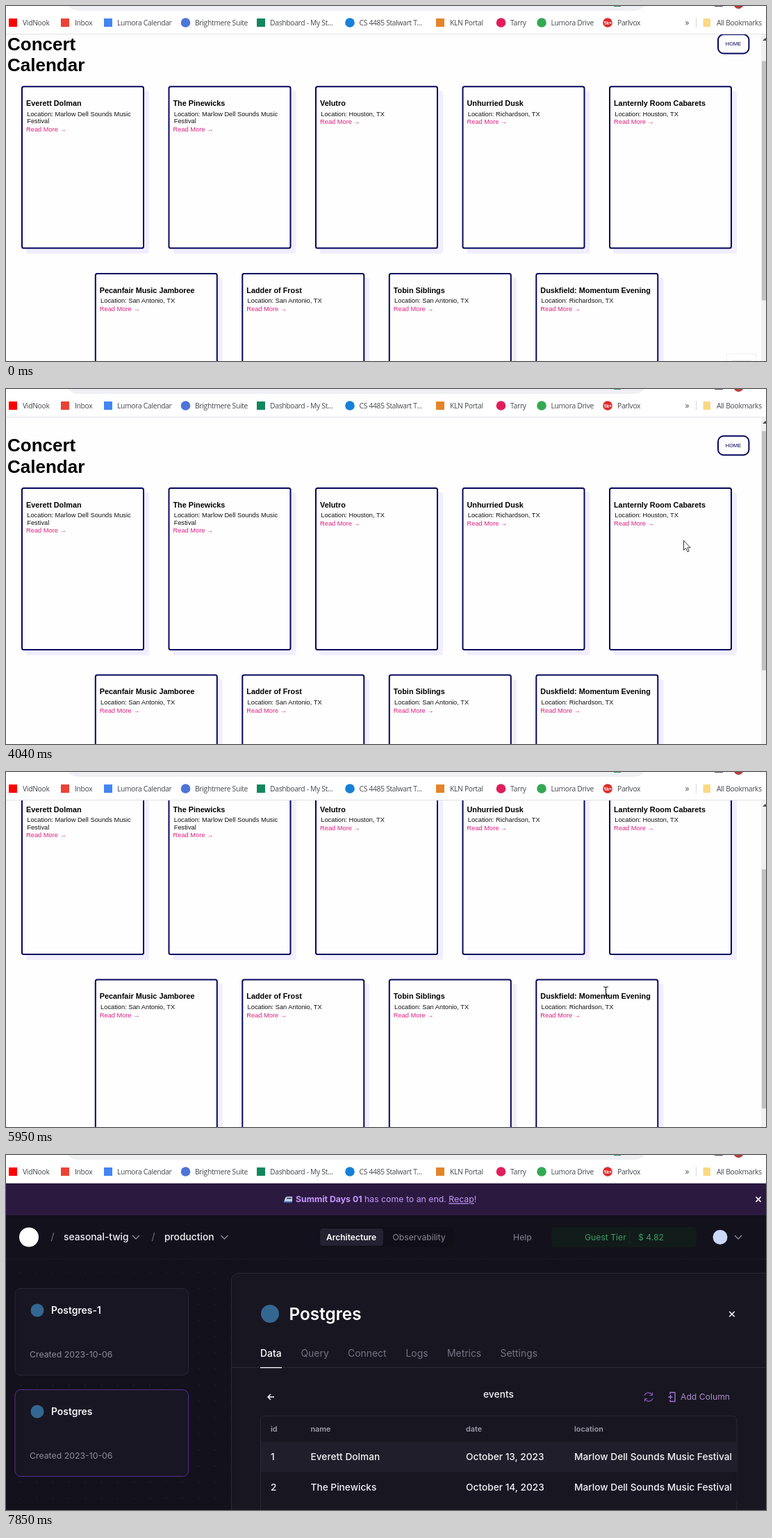
An HTML page for the animation above (8 s loop, 1094x512 px).

```html
<!DOCTYPE html>
<html lang="en">
<head>
<meta charset="utf-8">
<title>Concert Calendar</title>
<style>
  html, body { margin: 0; width: 100%; height: 100%; overflow: hidden; background: #fefefe; }
  svg { display: block; width: 1094px; height: 512px; }
  text { white-space: pre; }
  .page { font-family: "Liberation Sans", Arial, sans-serif; }
  .bar { font: 10.3px "Open Sans", "Noto Sans", sans-serif; letter-spacing: -.3px; fill: #45484c; }
  .dark { font-family: Inter, sans-serif; }
</style>
</head>
<body>
<svg id="stage" viewBox="0 0 1094 512"></svg>
<script>
const LOOP = 8000;
const NAVY = '#06065c';
const stage = document.getElementById('stage');

const text = (x, y, str, size, fill, extra = '') =>
  `<text x="${x}" y="${y}"${size ? ` font-size="${size}"` : ''}${fill ? ` fill="${fill}"` : ''} ${extra}>${str}</text>`;
const rect = (x, y, w, h, fill, extra = '') =>
  `<rect x="${x}" y="${y}" width="${w}" height="${h}" fill="${fill}" ${extra}/>`;
const dot = (x, y, r, fill) => `<circle cx="${x}" cy="${y}" r="${r}" fill="${fill}"/>`;
const path = (d, stroke, width = 1.2, extra = '') =>
  `<path d="${d}" fill="none" stroke="${stroke}" stroke-width="${width}" ${extra}/>`;
const bold = 'font-weight="700"', semi = 'font-weight="600"', medium = 'font-weight="500"';

// ---- concert page ----
const FEST = ['Marlow Dell Sounds Music', 'Festival'];
const rows = [
  { x: 22, y: 150, cards: [
    ['Everett Dolman', ...FEST],
    ['The Pinewicks', ...FEST],
    ['Velutro', 'Houston, TX'],
    ['Unhurried Dusk', 'Richardson, TX'],
    ['Lanternly Room Cabarets', 'Houston, TX']] },
  { x: 127.8, y: 419.6, cards: [
    ['Pecanfair Music Jamboree', 'San Antonio, TX'],
    ['Ladder of Frost', 'San Antonio, TX'],
    ['Tobin Siblings', 'San Antonio, TX'],
    ['Duskfield: Momentum Evening', 'Richardson, TX']] }
];

function card(x, y, [name, place, more]) {
  const linkY = y + (more ? 65.3 : 55);
  return rect(x + 7, y + 7, 177, 235, '#f0eeff', 'rx="3"') +
    rect(x + 1, y + 1, 175, 233, '#fefefe', `rx="2.5" stroke="${NAVY}" stroke-width="2"`) +
    text(x + 7, y + 28.8, name, 10.85, '#000', bold) +
    text(x + 8.3, y + 43.3, 'Location: ' + place, 9.28, '#111') +
    (more ? text(x + 8.3, y + 53.8, more, 9.28, '#111') : '') +
    text(x + 7, linkY, 'Read More →', 9.3, '#e0217f');
}

function concertPage() {
  const cards = rows.map(r => r.cards.map((c, i) => card(r.x + i * 211.5, r.y, c)).join('')).join('');
  return `<g id="light" class="page">${rect(0, 40, 1094, 472, '#fefefe')}
    <g id="scroll">
      ${text(2, 98.3, 'Concert', 26, '#000', bold)}${text(2, 128.5, 'Calendar', 26, '#000', bold)}
      ${rect(1025, 75.8, 44.4, 27.4, '#fefefe', `rx="8" stroke="${NAVY}" stroke-width="2"`)}
      ${text(1047, 92.2, 'HOME', 7.5, NAVY, 'text-anchor="middle"')}
      ${cards}
    </g>
    ${rect(1087, 41, 7, 471, '#f1f1f1')}
    <path id="up" d="M1089 50L1093 46L1097 50Z"/>
    <rect id="thumb" x="1088" y="55" width="6" height="345" fill="#c1c1c1"/>
    <g id="ghost">${rect(1037.5, 501.5, 42, 20, 'none', 'stroke="#f1f1f1"')}
      <g id="ghostText">${rect(1045, 510.5, 28, 2, '#ececec')}</g></g>
  </g>`;
}

// ---- dark dashboard ----
const chevron = (x, y) => path(`M${x - 5} ${y - 2.5}l5 5l5 -5`, '#8d8998', 1.4);
const cross = (x, y, s) => path(`M${x - s} ${y - s}l${2 * s} ${2 * s}M${x + s} ${y - s}l${-2 * s} ${2 * s}`, '#fff', 1.5);

function service(y, name, stroke) {
  return rect(13, y, 249.5, 125, '#181622', `rx="8" stroke="${stroke}"`) +
    dot(45, y + 31.5, 9.5, '#336791') +
    text(65, y + 36.7, name, 13.9, '#f4f3f7', semi) +
    text(34, y + 99, 'Created 2023-10-06', 12.3, '#8f8b9b');
}

function record(y, fill, cells) {
  return rect(367, y, 685, 43.5, fill) +
    [381, 438.5, 662, 818].map((x, i) => text(x, y + 26.6, cells[i], 13.7, '#f4f3f7', medium)).join('');
}

function dashboard() {
  const tabs = [[366, 'Data'], [424.5, 'Query'], [492, 'Connect'], [575.5, 'Logs'], [635, 'Metrics'], [711.5, 'Settings']];
  const heads = [[381, 'id'], [438.5, 'name'], [662, 'date'], [818, 'location']];
  return `<g id="dark" class="dark">
    <defs><pattern id="dots" x="10" y="158" width="23.3" height="23.3" patternUnits="userSpaceOnUse">${dot(11, 11, .7, '#2f2c3a')}</pattern></defs>
    ${rect(0, 41, 1094, 471, '#13111c')}${rect(0, 150, 324, 362, 'url(#dots)')}
    ${rect(0, 41, 1094, 46, '#2b1940')}
    <path d="M400 68l2-6q1-2 3-2h7v8z" fill="#cfd8e6"/>${rect(400, 66.5, 12, 2, '#4f86c6')}${rect(404, 61.5, 7, 2, '#35506f')}
    <text x="417" y="68.4" font-size="12.3" fill="#c597fb"><tspan ${bold}>Summit Days 01</tspan> has come to an end. <tspan text-decoration="underline">Recap</tspan>!</text>
    ${cross(1083, 64, 3.6)}
    ${dot(33, 118.5, 14, '#fff')}
    ${text(64.5, 123.3, '/', 14, '#777382')}${text(83, 123.3, 'seasonal-twig', 13.8, '#f4f3f7', medium)}${chevron(187, 118.5)}
    ${text(209.5, 123.3, '/', 14, '#777382')}${text(228, 123.3, 'production', 13.8, '#f4f3f7', medium)}${chevron(314.5, 118.5)}
    ${rect(451, 104, 193, 29, '#100e17', 'rx="5"')}${rect(452, 106, 91, 25, '#242130', 'rx="4"')}
    ${text(461, 122.8, 'Architecture', 12, '#fff', semi)}${text(556.5, 122.8, 'Observability', 12.2, '#8b8795')}
    ${text(730, 122.8, 'Help', 12.3, '#868291')}
    ${rect(785, 104, 209, 29, '#111b19', 'rx="5"')}
    ${text(833, 122.8, 'Guest Tier', 12.2, '#3f9a68')}${rect(897, 109, 1, 19, '#1b2823')}${text(910, 122.8, '$ 4.82', 12.2, '#3f9a68')}
    ${dot(1028, 118.5, 10.5, '#cbd8f6')}${chevron(1054, 118.5)}
    ${path('M0 150H1094', '#24212e', 1, 'stroke-dasharray="2 2"')}
    ${service(192.5, 'Postgres-1', '#2b2836')}${service(338.5, 'Postgres', '#55318c')}
    ${rect(324.5, 170.5, 800, 400, '#181621', 'rx="10" stroke="#2b2836"')}
    ${dot(380, 229, 13, '#336791')}${text(407.5, 238.2, 'Postgres', 24.3, '#fff', semi)}${cross(1045, 229.5, 3.8)}
    ${tabs.map(([x, s], i) => text(x, 290.5, s, 13.9, i ? '#777382' : '#fff', i ? '' : medium)).join('')}
    ${rect(325, 306, 769, 1, '#2b2836')}${rect(366, 306, 31, 1.3, '#fff')}
    ${path('M386 349H377M381 345l-4 4l4 4', '#fff', 1.4)}
    ${text(709, 349.5, 'events', 13.8, '#f4f3f7', medium + ' text-anchor="middle"')}
    ${path('M919 347a6 6 0 0 1 11 -1M931 351a6 6 0 0 1 -11 1M930.500 342.500v4h-4M919.500 355.500v-4h4', '#8459b8')}
    ${path('M956 345v-2.500h7v13h-7v-2.500M953.500 349h6M956.500 346v6', '#a077d0', 1.4)}
    ${text(971, 353.3, 'Add Column', 12.2, '#a88bc9')}
    ${rect(366.5, 376.5, 685.5, 160, '#181621', 'rx="6" stroke="#2b2836"')}
    ${heads.map(([x, s]) => text(x, 398.6, s, 10.8, '#a09cab', semi)).join('')}
    ${record(413.5, '#201e2a', ['1', 'Everett Dolman', 'October 13, 2023', FEST.join(' ')])}
    ${record(457, '#181621', ['2', 'The Pinewicks', 'October 14, 2023', FEST.join(' ')])}
  </g>`;
}

// ---- browser bar ----
function bookmarks() {
  const items = [
    [10, '#f00', 0, 24, 'VidNook'], [85, '#ea4335', 0, 99, 'Inbox'],
    [147, '#4285f4', 0, 160, 'Lumora Calendar'], [258.5, '#4f74d9', 1, 272, 'Brightmere Suite'],
    [367, '#12875d', 0, 380, 'Dashboard - My St...'], [495, '#1680d8', 1, 508.5, 'CS 4485 Stalwart T...'],
    [625, '#e5842b', 0, 639, 'KLN Portal'], [712.5, '#e01e5a', 1, 726, 'Tarry'],
    [771, '#34a853', 1, 784.5, 'Lumora Drive'], [866, '#df2c2c', 1, 880, 'Parlvox']];
  return `<g class="bar">${rect(0, 0, 1094, 41, '#fff')}${rect(85, -31, 838, 38, '#eef0f3', 'rx="19"')}
    ${rect(875, -1, 10, 2, '#3f9168')}${rect(1020, -1, 12, 2, '#555b66')}${dot(1054.500, -3, 7, '#b5403c')}
    ${rect(0, 40, 1094, 1, '#dfe1e5')}
    ${items.map(([cx, c, round, x, s]) =>
      (round ? dot(cx, 24, 6.8, c) : rect(cx - 6, 18, 12, 12, c)) + text(x, 28, s)).join('')}
    ${text(866, 27, '1k+', 7, '#fff', bold + ' text-anchor="middle"')}
    ${text(977.5, 27.5, '»', 12)}${rect(993, 17, 1, 14, '#d5d8dc')}
    <path d="M1004 18h9q1 0 1 1v11h-9q-1.500 0-1.500-1.500v-9.500q0-1 .5-1z" fill="#fbd883"/>
    ${text(1023, 28, 'All Bookmarks')}</g>`;
}

function hoverCard() {
  return `<g id="tip">
    ${rect(806, -20, 223, 174.5, '#000', 'rx="5" opacity=".07"')}
    ${rect(807, -20, 221, 173, '#fbfbfc', 'rx="4" stroke="#d9dbdf" stroke-width="1"')}
    ${rect(808, 29, 219, 123, '#f8f9fa')}
    ${text(823, 15, 'railway.app', 11, '#5c5c60', 'font-family="Open Sans, sans-serif"')}
    ${dot(916.500, 89.500, 23, '#e6e8eb')}
    <path d="M898 87l12 11v4l5 4v5q-16-3-17-24zM920 71v3q0 4-5 4v5h-5v5h13q3 0 3 4v6h4q3 0 4 4 9-12 1-24-5-6-15-7z" fill="#f8f9fa"/>
  </g>`;
}

const pointer = `<g id="pointer">
  <path id="arrow" d="M0 0V14L3.200 11L5.500 16.300L7.700 15.400L5.500 10.300H9.700Z" fill="#fff" stroke="#222" stroke-width=".9"/>
  ${path('M-3.500 -6.500H-1Q0 -6.500 0 -5.500Q0 -6.500 1 -6.500H3.500M0 -5.500V5.500M-3.500 6.500H-1Q0 6.500 0 5.500Q0 6.500 1 6.500H3.500', '#111', 1.1, 'id="beam"')}</g>`;

stage.innerHTML = concertPage() + dashboard() + bookmarks() + hoverCard() + pointer;
const el = Object.fromEntries([...stage.querySelectorAll('[id]')].map(n => [n.id, n]));

// ---- motion ----
const scrollSteps = [[0, 34.7], [1010, 17], [1080, 0], [4040, 8], [4110, 48], [4180, 92],
  [4240, 116.3], [4310, 130], [5950, 121], [6015, 52], [6080, 0]];
const tipSteps = [[0, 0], [7570, .3], [7640, .62], [7710, .86], [7790, 1], [7850, 0]];

// start, end, steps, then way points [step, x, y, over text]
const moves = [
  [400, 740, 6, [[1, 1032, 497], [3, 880, 335], [5, 777, 232], [6, 784.5, 225.5]]],
  [1480, 2230, 12, [[0, 784.5, 225.5], [3, 620, 190], [7, 310, 125], [10, 130, 76], [11, 80, 79, 1], [12, 40, 95, 1]]],
  [2300, 3070, 12, [[0, 40, 95, 1], [2, 9, 112, 1], [4, 40, 148], [7, 165, 184], [10, 360, 195.5], [12, 483.5, 184.5]]],
  [3140, 3210, 2, [[0, 483.5, 184.5], [2, 566, 202]]],
  [3410, 3770, 6, [[0, 566, 202], [3, 800, 207], [6, 975.5, 218.5]]],
  [4310, 4780, 8, [[0, 975.5, 218.5], [4, 640, 262], [8, 260, 296]]],
  [4850, 5550, 11, [[0, 260, 296], [2, 195, 290], [5, 400, 300], [8, 650, 306], [11, 863.5, 316.5, 1]]],
  [6080, 6081, 2, [[0, 863, 308], [2, 863, 308]]],
  [6480, 7170, 11, [[0, 863, 308], [3, 830, 235], [6, 768, 110], [9, 774, 28], [11, 785, -25]]]
];

const held = (steps, t) => steps.filter(s => s[0] <= t).pop()[1];

function pointerAt(t) {
  const move = moves.filter(m => m[0] <= t).pop();
  if (!move) return null;
  const [t0, t1, n, pts] = move;
  const u = Math.min(n, Math.floor((t - t0) * (n - 1) / (t1 - t0) + 1e-6) + 1);
  const i = Math.max(1, pts.findIndex(p => p[0] >= u));
  const a = pts[i - 1], b = pts[i], f = (u - a[0]) / (b[0] - a[0]);
  return { x: a[1] + (b[1] - a[1]) * f, y: a[2] + (b[2] - a[2]) * f, beam: (f < .5 ? a : b)[3] };
}

const show = (node, on) => node.setAttribute('visibility', on ? 'inherit' : 'hidden');

function draw(t) {
  const y = held(scrollSteps, t), p = pointerAt(t), dark = t >= 7850;
  el.scroll.setAttribute('transform', `translate(0 ${-y})`);
  el.thumb.setAttribute('y', 55 + y * .705);
  el.up.setAttribute('fill', y ? '#505050' : '#b0b0b0');
  show(el.ghost, t < 400);
  show(el.ghostText, t < 70);
  show(el.light, !dark);
  show(el.dark, dark);
  el.tip.setAttribute('opacity', held(tipSteps, t));
  show(el.pointer, p && !dark);
  if (p) {
    el.pointer.setAttribute('transform', `translate(${p.x} ${p.y})`);
    show(el.arrow, !p.beam);
    show(el.beam, p.beam);
  }
}

const begin = performance.now();
function tick() {
  draw((performance.now() - begin) % LOOP);
  requestAnimationFrame(tick);
}
tick();
</script>
</body>
</html>
```
